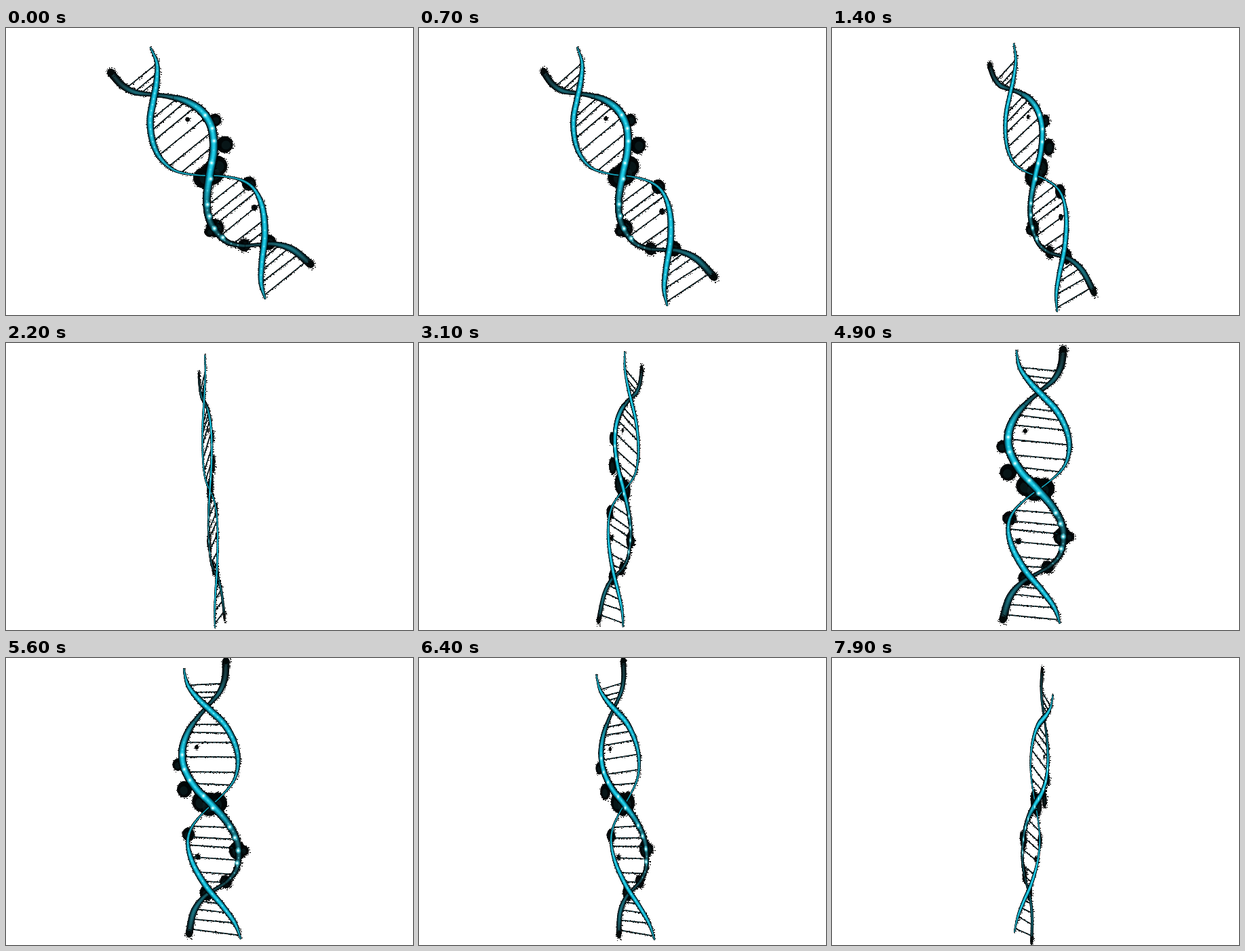
Write an HTML page with a canvas that moves like this. It is 600 px wide and 424 px high and loops after 8000 ms.

```html
<!DOCTYPE html>
<html lang="en">
<head>
<meta charset="utf-8">
<title>Turning helix</title>
<style>
  html, body { margin: 0; width: 100%; height: 100%; overflow: hidden; background: #fff; }
  canvas { display: block; width: 600px; height: 424px; }
</style>
</head>
<body>
<canvas id="stage" width="600" height="424"></canvas>
<script>
const ctx = document.getElementById('stage').getContext('2d');
const LOOP = 8000, STEP = 100, DEPTH = 1000, SUB = 10;

// Orientation of the flat helix: time, x axis (3), y axis (3)
const POSES = [
  [0, -.86, .57, 0, .565, .824, 0],
  [1400, -.57, .38, -.70, .264, .912, .31],
  [2200, -.15, .30, -.942, .06, .955, .29],
  [3800, .74, .14, -.66, -.10, .985, .097],
  [4900, 1, 0, 0, 0, 1, 0],
  [6400, .60, -.14, .79, .117, .99, .087],
  [7900, -.26, -.39, .883, -.095, .93, .37]
];

// Strand points: x, y, width, brightness
const thin = spline([
  [-29, -203, 1, .7], [-24, -178, 5, .9], [-8, -155, 8, 1], [11, -135, 9, 1],
  [31, -113, 9, 1], [45, -85, 8, .9], [49, -58, 6, .8], [41, -31, 3, .8],
  [18, -8, 1.5, .8], [-11, 13, 1.5, .8], [-33, 35, 3, .8], [-41, 58, 5, .9],
  [-35, 88, 8, 1], [-16, 122, 9, 1], [9, 152, 8, 1], [27, 177, 6, .9], [35, 200, 1.5, .6]
]);
const thick = spline([
  [40, -205, 10, 0], [37, -181, 9, .1], [27, -161, 7, .35], [9, -145, 5, .15],
  [-11, -128, 6, .3], [-29, -108, 9, .7], [-40, -83, 11, 1], [-39, -55, 11, 1],
  [-23, -25, 11, 1], [2, 2, 11, 1], [27, 32, 10, .6], [40, 62, 9, .35],
  [37, 95, 7, .25], [21, 115, 5, .15], [-1, 128, 4, .15], [-21, 140, 6, .3],
  [-39, 162, 9, .4], [-49, 195, 10, 0]
]);
const rungs = [-176, -164, -156, -116, -104, -89, -67, -45, -28,
  35, 52, 66, 81, 104, 116, 148, 161, 175, 191]
  .map(y => [meet(thin, y), meet(thick, y)]);
const blobs = [
  [-49, -61, 9], [-41, -23, 12], [-28, -30, 6], [-14, -3, 15], [-2, 2, 17], [12, 1, 15],
  [-39, 45, 10], [39, 72, 13], [49, 72, 7], [17, 117, 9], [-15, 133, 11],
  [-16, -84, 3], [-26, 79, 4]
];
const glows = [[-41, -75], [-39, -53], [-31, -36], [-10, -11], [4, 8],
  [29, 37], [36, 53], [40, 72], [37, 90]];

let ax, ay;

function rnd(i) {
  const v = Math.sin(i * 127.1 + 3.7) * 43758.5453;
  return v - Math.floor(v);
}

function spline(p) {
  const out = [], at = i => p[Math.max(0, Math.min(p.length - 1, i))];
  for (let i = 0; i < p.length - 1; i++) {
    const a = at(i - 1), b = at(i), c = at(i + 1), d = at(i + 2);
    for (let k = 0; k < SUB; k++) {
      const u = k / SUB;
      out.push(b.map((v, n) => v + .5 * u * (c[n] - a[n] +
        u * (2 * a[n] - 5 * v + 4 * c[n] - d[n] + u * (3 * (v - c[n]) + d[n] - a[n])))));
    }
  }
  out.push(p[p.length - 1]);
  // Unit normals for the ribbon edges
  return out.map((q, i) => {
    const a = out[Math.max(0, i - 1)], b = out[Math.min(out.length - 1, i + 1)];
    const dx = b[0] - a[0], dy = b[1] - a[1], len = Math.hypot(dx, dy);
    return { x: q[0], y: q[1], w: Math.max(.8, q[2]), l: Math.max(0, Math.min(1, q[3])),
      nx: -dy / len, ny: dx / len };
  });
}

// Where a strand meets the slightly tilted line through height y
function meet(strand, y) {
  const gap = q => Math.abs(q.y - y - .1 * q.x);
  return strand.reduce((a, b) => gap(b) < gap(a) ? b : a);
}

function setPose(t) {
  const n = POSES.length - 1;
  let i = 0;
  while (i < n - 1 && t >= POSES[i + 1][0]) i++;
  const a = POSES[i], b = POSES[i + 1], h = b[0] - a[0], u = (t - a[0]) / h;
  const chord = (j, c) => (POSES[j + 1][c] - POSES[j][c]) / (POSES[j + 1][0] - POSES[j][0]);
  const slope = (j, c) => {
    if (j === 0) return 1.5 * chord(0, c) - .5 * slope(1, c);
    if (j === n) return 1.5 * chord(n - 1, c) - .5 * slope(n - 1, c);
    return (POSES[j + 1][c] - POSES[j - 1][c]) / (POSES[j + 1][0] - POSES[j - 1][0]);
  };
  const v = [1, 2, 3, 4, 5, 6].map(c => {
    const s = u * u * (3 - 2 * u);
    return a[c] * (1 - s) + b[c] * s +
      h * (slope(i, c) * u * (1 - u) ** 2 - slope(i + 1, c) * u * u * (1 - u));
  });
  const unit = q => q.map(e => e / Math.hypot(...q));
  ax = unit(v.slice(0, 3));
  ay = v.slice(3);
  const d = ax[0] * ay[0] + ax[1] * ay[1] + ax[2] * ay[2];
  ay = unit(ay.map((e, k) => e - d * ax[k]));
}

function project(x, y) {
  const s = 1 / (1 - (ax[2] * x + ay[2] * y) / DEPTH);
  return [300.8 + (ax[0] * x + ay[0] * y) * s, 214 + (ax[1] * x + ay[1] * y) * s];
}

function poly(pts, fill, line) {
  ctx.beginPath();
  pts.forEach(p => ctx.lineTo(p[0], p[1]));
  ctx.closePath();
  ctx.fillStyle = fill;
  ctx.fill();
  if (line) {
    ctx.strokeStyle = fill;
    ctx.lineWidth = line;
    ctx.stroke();
  }
}

function speck(p, seed, spread) {
  if (rnd(seed) > .62) return;
  const x = Math.round(p[0] + (rnd(seed + .3) - .5) * spread);
  const y = Math.round(p[1] + (rnd(seed + .6) - .5) * spread);
  ctx.fillStyle = '#000';
  ctx.fillRect(x, y, rnd(seed + .9) > .7 ? 2 : 1, 1);
}

function disc(x, y, r, fill, line) {
  const pts = [];
  for (let a = 0; a < 6.28; a += .314) pts.push(project(x + r * Math.cos(a), y + r * Math.sin(a)));
  poly(pts, fill, line);
}

function fringe(x, y, r, seed) {
  const n = Math.round(r * 6);
  for (let i = 0; i < n; i++) {
    const a = i / n * 6.283;
    speck(project(x + (r + .6) * Math.cos(a), y + (r + .6) * Math.sin(a)), seed + i, 3);
  }
}

function edge(q, k) {
  return project(q.x + q.nx * q.w * k, q.y + q.ny * q.w * k);
}

function ribbon(s, from, to, k, color, line) {
  for (let i = from; i < to; i++) {
    const a = s[i], b = s[i + 1];
    poly([edge(a, -k), edge(b, -k), edge(b, k), edge(a, k)], color(a.l), line);
  }
}

const mix = (a, b) => l => `rgb(${a.map((v, i) => Math.round(v + (b[i] - v) * l))})`;
const black = () => '#010607';
const rim = mix([4, 14, 16], [5, 88, 106]);
const body = mix([10, 28, 31], [12, 150, 176]);
const core = mix([26, 52, 56], [32, 206, 232]);

function strand(s, from, to, seed) {
  for (let i = from; i < to; i++) {
    const a = s[i], b = s[i + 1];
    for (let j = 0; j < 2; j++) {
      const m = { x: a.x + (b.x - a.x) * j / 2, y: a.y + (b.y - a.y) * j / 2,
        w: a.w + 1.4, nx: a.nx, ny: a.ny };
      speck(edge(m, .5), seed + i * 4 + j, 2.6);
      speck(edge(m, -.5), seed + i * 4 + j + 2, 2.6);
    }
  }
  ribbon(s, from, to, .5, black, 1.5);
  ribbon(s, from, to, .45, rim, .5);
  ribbon(s, from, to, .32, body, .5);
  ribbon(s, from, to, .16, core, .5);
}

function rung([a, b], seed) {
  const p = project(a.x, a.y), q = project(b.x, b.y);
  const n = Math.ceil(Math.hypot(q[0] - p[0], q[1] - p[1]));
  const line = (color, w, dash) => {
    ctx.beginPath();
    ctx.moveTo(...p);
    ctx.lineTo(...q);
    ctx.setLineDash(dash);
    ctx.strokeStyle = color;
    ctx.lineWidth = w;
    ctx.stroke();
    ctx.setLineDash([]);
  };
  line('#020708', 1.7, []);
  for (let i = 0; i < n; i++) {
    const u = i / n;
    speck([p[0] + (q[0] - p[0]) * u, p[1] + (q[1] - p[1]) * u], seed + i, 3);
  }
  line('#0d5361', .8, [3, 4]);
}

function draw(t) {
  setPose(t);
  ctx.fillStyle = '#fff';
  ctx.fillRect(0, 0, 600, 424);

  blobs.forEach(([x, y, r], i) => {
    fringe(x, y, r, 900 + i * 97);
    disc(x, y, r, '#020607', 1);
  });
  blobs.forEach(([x, y, r]) => {
    if (r > 5) disc(x - r * .1, y + r * .15, r * .55, 'rgba(14,38,41,.5)');
  });

  rungs.forEach((r, i) => rung(r, 3000 + i * 113));

  const last = thick.length - 1;
  strand(thick, 0, last, 5000);
  [thick[0], thick[last]].forEach((q, i) => {
    fringe(q.x, q.y, 6, 7000 + i * 50);
    disc(q.x, q.y, 4.8, '#030909', 1);
  });

  strand(thin, 0, thin.length - 1, 8000);
  for (let i = 8; i < thin.length - 5; i += 3) {
    const q = thin[i];
    if (q.w > 3.5) disc(q.x, q.y, q.w * .15, 'rgba(125,236,250,.75)');
  }

  strand(thick, 43, 132, 9500);
  for (let i = 56; i < 132; i += 4) {
    const q = thick[i];
    disc(q.x, q.y, 1.2, 'rgba(120,225,238,.6)');
  }
  glows.forEach(([x, y]) => {
    disc(x, y, 4.4, 'rgba(70,220,240,.4)');
    disc(x, y, 2.8, 'rgba(130,240,250,.65)');
    disc(x, y, 1.6, '#d8fcff');
  });
}

let start = null, shown = -1;
function tick(now) {
  if (start === null) start = now;
  const t = Math.floor(((now - start) % LOOP) / STEP) * STEP;
  if (t !== shown) draw(shown = t);
  requestAnimationFrame(tick);
}
draw(0);
requestAnimationFrame(tick);
</script>
</body>
</html>
```
